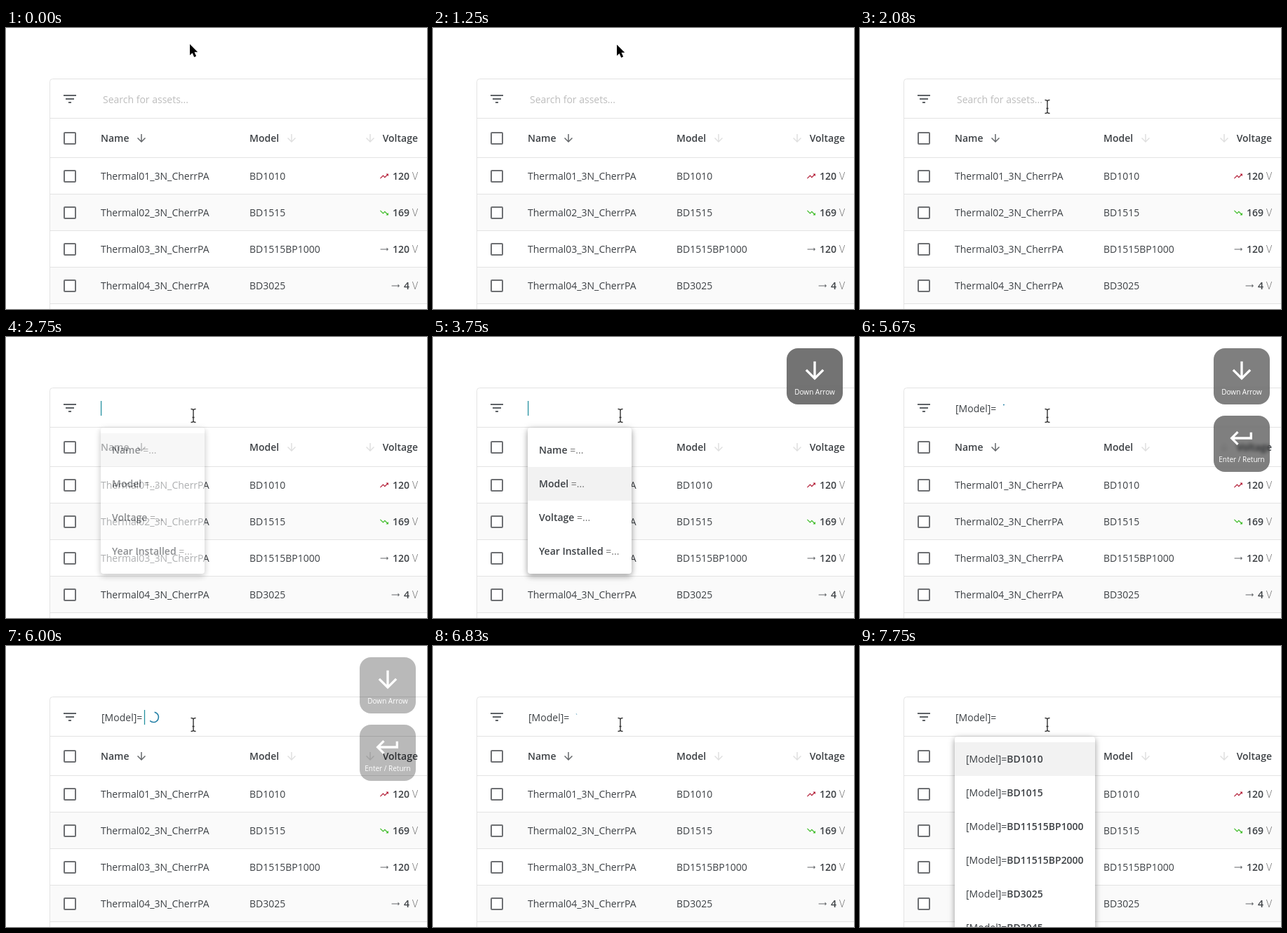
Animation, 600 px wide and 400 px high, one loop 8 s. Source, as an HTML page:

```html
<!DOCTYPE html>
<html lang="en">
<head>
<meta charset="utf-8">
<title>Asset search</title>
<style>
  html, body { margin: 0; width: 100%; height: 100%; overflow: hidden; background: #fff; }
  #stage { position: absolute; left: 0; top: 0; width: 600px; height: 400px; overflow: hidden; }
  svg { position: absolute; left: 0; top: 0; display: block; }
  text { font: 14px "Open Sans", sans-serif; fill: #3d4145; }
  .b { font-weight: 600; }
  .unit { font-weight: 300; fill: #666; }
  .hint { fill: #bdbdbd; }
  .soft { fill: #757575; }
  .line { stroke: #e3e3e3; fill: none; }
  .box { fill: #fff; stroke: #6e7073; stroke-width: 2; }
  .menu { filter: drop-shadow(0 4px 4px rgba(0,0,0,.24)) drop-shadow(0 1px 5px rgba(0,0,0,.18)); }
  .key { position: absolute; left: 504px; width: 80px; height: 80px; border-radius: 16px; }
  .key text { font-size: 10px; fill: #fff; text-anchor: middle; }
</style>
</head>
<body>
<div id="stage">
  <svg id="scene" width="600" height="400" viewBox="0 0 600 400"></svg>
  <div class="key" id="down" style="top:16px"></div>
  <div class="key" id="enter" style="top:112px"></div>
</div>
<script>
const LOOP = 8000;
const $ = id => document.getElementById(id);
const clamp = v => Math.max(0, Math.min(1, v));
const ramp = (t, a, b) => clamp((t - a) / (b - a));
const ease = p => (1 - Math.cos(Math.PI * p)) / 2;
const within = (t, a, b) => t >= a && t < b;

const icons = {
  down: 'M20 12l-1.41-1.41L13 16.17V4h-2v12.17l-5.58-5.59L4 12l8 8 8-8z',
  enter: 'M19 7v4H5.83l3.58-3.59L8 6l-6 6 6 6 1.41-1.41L5.83 13H21V7z',
  up: 'M16 6l2.29 2.29-4.88 4.88-4-4L2 16.59 3.41 18l6-6 4 4 6.3-6.29L22 12V6z',
  drop: 'M16 18l2.29-2.29-4.88-4.88-4 4L2 7.41 3.41 6l6 6 4-4 6.3 6.29L22 12v6z',
  flat: 'M22 12l-4-4v3H3v2h15v3z'
};
const icon = (name, cx, cy, k, fill) =>
  `<path d="${icons[name]}" fill="${fill}" transform="translate(${cx} ${cy}) scale(${k}) translate(-12 -12)"/>`;
const text = (x, y, s, cls = '', extra = '') =>
  `<text x="${x}" y="${y}" class="${cls}" ${extra}>${s}</text>`;
const bold = s => `<tspan class="b">${s}</tspan>`;
const check = y => `<rect class="box" x="83" y="${y - 8}" width="16" height="16" rx="1"/>`;
const END = 'text-anchor="end"';

const rows = [
  ['BD1010', '120', 'up', '#b5233c'],
  ['BD1515', '169', 'drop', '#41bd2b'],
  ['BD1515BP1000', '120', 'flat', '#66696c'],
  ['BD3025', '4', 'flat', '#66696c']
];

function table() {
  let s = '';
  rows.forEach(([model, volts, trend, color], i) => {
    const y = 211 + 52 * i;
    if (i % 2) s += `<rect x="63" y="${y - 26}" width="537" height="52" fill="#fafafa"/>`;
    s += check(y)
      + text(135, y + 5, `Thermal0${i + 1}_3N_CherrPA`)
      + text(347, y + 5, model)
      + icon(trend, volts.length > 1 ? 539 : 555, y, .6, color)
      + text(575, y + 5, volts, 'b', END)
      + text(587, y + 5, 'V', 'unit', END);
  });
  for (const y of [128.5, 184.5, 236.5, 288.5, 340.5, 392.5])
    s += `<path class="line" d="M62 ${y}H600"/>`;
  return s
    + '<path class="line" d="M600 72.5H66.5a4 4 0 0 0-4 4V400"/>'
    + '<path d="M82 96h18M85 101h12M89 106h4" stroke="#5f6367" stroke-width="2"/>'
    + check(157)
    + text(135, 162, 'Name', 'b') + icon('down', 193, 157, .75, '#66696c')
    + text(347, 162, 'Model', 'b') + icon('down', 407, 157, .75, '#e0e0e0')
    + icon('down', 519, 157, .75, '#e0e0e0') + text(587, 162, 'Voltage', 'b', END);
}

function menu(id, width, items) {
  return `<g id="${id}" class="menu">
    <rect x="135" y="129" width="${width}" height="${items.length * 48 + 16}" rx="4" fill="#fff"/>
    <rect id="${id}Pick" x="135" y="137" width="${width}" height="48" fill="#f2f2f2"/>
    ${items.map((s, i) => text(151, 166 + 48 * i, s)).join('')}</g>`;
}

const fields = ['Name', 'Model', 'Voltage', 'Year Installed']
  .map(s => `${bold(s)}<tspan class="soft"> =...</tspan>`);
const models = ['BD1010', 'BD1015', 'BD11515BP1000', 'BD11515BP2000', 'BD3025', 'BD3045']
  .map(s => '[Model]=' + bold(s));

$('scene').innerHTML = table()
  + text(138, 107, 'Search for assets...', 'hint', 'id="hint"')
  + text(136, 107, '[Model]=', '', 'id="query"')
  + '<path id="caret" d="M0 91V112" stroke="#2691a0" stroke-width="1.3"/>'
  + '<path id="spinner" fill="none" stroke="#2580a6" stroke-width="1.6"/>'
  + menu('fields', 148, fields) + menu('models', 200, models)
  + `<path id="arrow" d="M0 0V15.8L3.6 12.4L6.2 18.4L9.1 17.1L6.5 11.3H11.2Z"
      fill="#000" stroke="#fff" stroke-width="1" paint-order="stroke"/>`
  + `<path id="beam" d="M-3.5-9.5Q0-9.5 0-7.5Q0-9.5 3.5-9.5M0-8V8M-3.5 9.5Q0 9.5 0 7.5Q0 9.5 3.5 9.5M-1.5 2.5H1.5"
      fill="none" stroke="#333" stroke-width="1.4"/>`;

for (const [id, label] of [['down', 'Down Arrow'], ['enter', 'Enter / Return']])
  $(id).innerHTML = `<svg width="80" height="80">${icon(id, 40, 32, 1.667, '#fff')}${text(40, 66, label)}</svg>`;

const show = (id, on) => { $(id).style.display = on ? '' : 'none'; };
const fade = (id, a) => { show(id, a > 0); $(id).style.opacity = a; };

// Arc grows in the first half of a turn and shrinks in the second.
function arc(t) {
  const turn = (t - 4400) / 1200, n = Math.floor(turn), p = turn - n;
  const grow = ease(clamp(p * 2)), shrink = ease(clamp(p * 2 - 1));
  const start = -40 + .198 * (t - 4580) + 489 * (n + shrink);
  const len = 4 + 280 * (grow - shrink);
  const at = deg => {
    const a = deg * Math.PI / 180;
    return `${(210.3 + 7.2 * Math.sin(a)).toFixed(2)} ${(101.3 - 7.2 * Math.cos(a)).toFixed(2)}`;
  };
  return `M${at(start)}A7.2 7.2 0 ${len > 180 ? 1 : 0} 1 ${at(start + len)}`;
}

const blinks = [[2580, 3080], [3750, 4170], [4580, 5160], [5740, 6320], [6900, 7750]];

function key(id, from, t) {
  const a = t < from ? 0 : 1 - ramp(t, 5600, 6400);
  const el = $(id);
  show(id, a > 0);
  el.style.background = `rgba(0,0,0,${.55 * a})`;
  el.style.backdropFilter = a > .6 ? `blur(${3 * a}px)` : 'none';
  el.firstChild.style.opacity = Math.min(1, a * 2);
}

function draw(t) {
  const move = ease(ramp(t, 1200, 2080));
  const x = 262 + 5 * move, y = 23 + 89 * move;
  const inField = y > 74;
  show('arrow', !inField);
  show('beam', inField);
  $(inField ? 'beam' : 'arrow').setAttribute('transform', `translate(${x} ${y})`);

  show('hint', t < 2580);
  show('query', t >= 4580);
  show('caret', blinks.some(([a, b]) => within(t, a, b)));
  $('caret').setAttribute('transform', `translate(${t < 4580 ? 135.6 : 197.5} 0)`);

  show('spinner', within(t, 4580, 7250));
  $('spinner').setAttribute('d', arc(t));

  fade('fields', t < 4580 ? ramp(t, 2540, 2900) : 0);
  $('fieldsPick').setAttribute('y', t < 3750 ? 137 : 185);
  fade('models', ramp(t, 7220, 7560));

  key('down', 3750, t);
  key('enter', 4580, t);
}

const begin = performance.now();
function tick() {
  draw((performance.now() - begin) % LOOP);
  requestAnimationFrame(tick);
}
tick();
</script>
</body>
</html>
```
